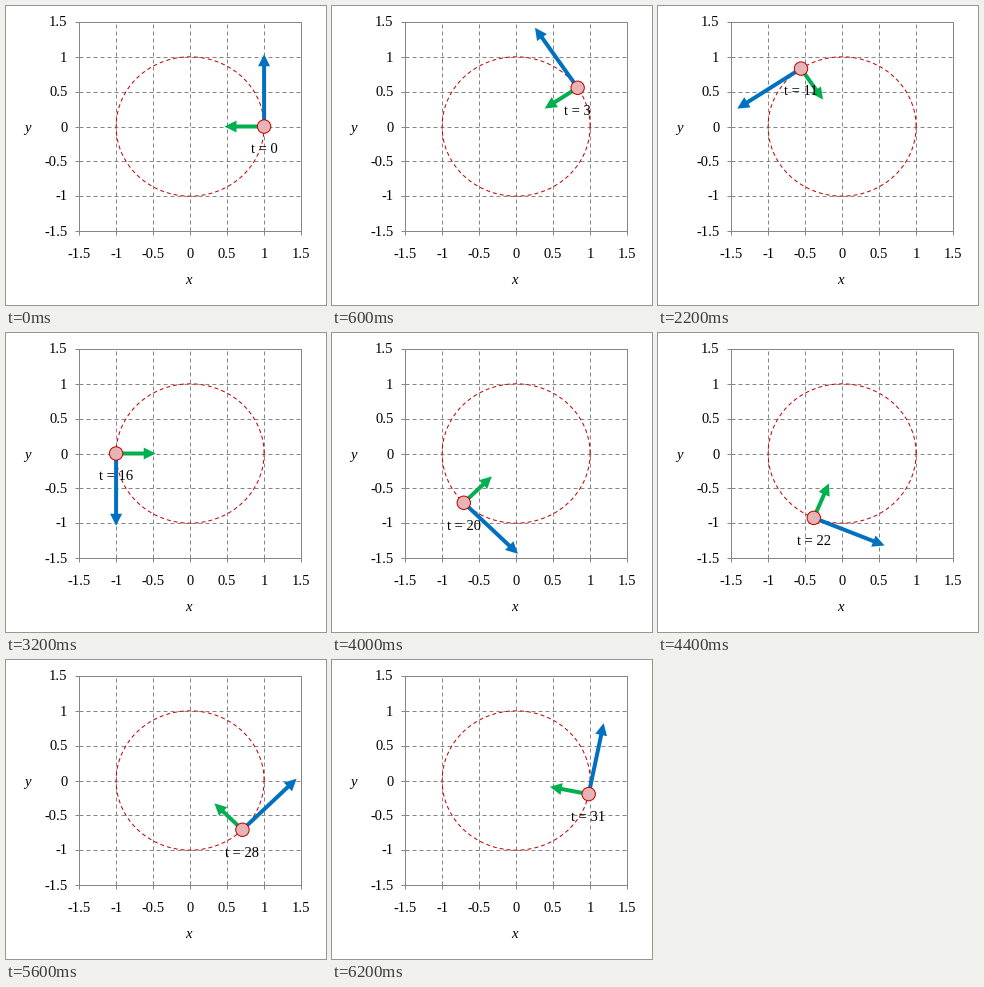
Animation of 320x299 px, one loop 6.4 s. Source, as a matplotlib script:

```python
import numpy as np
import matplotlib.pyplot as plt
from matplotlib.animation import FuncAnimation
from matplotlib.patches import Circle, Polygon

WIDTH, HEIGHT, DPI = 320, 299, 64
PT = 72 / DPI  # points per pixel
STEPS = 32
LEFT, RIGHT, TOP, BOTTOM = 73.5, 295.5, 16.5, 225.5
GRAY, RED, BLUE, GREEN = "#868686", "#c00000", "#0070c0", "#00b050"
TICKS = [-1.5, -1, -0.5, 0, 0.5, 1, 1.5]

plt.rcParams["font.family"] = "Liberation Serif"
plt.rcParams["font.size"] = 14.67 * PT

fig = plt.figure(figsize=(WIDTH / DPI, HEIGHT / DPI), dpi=DPI, facecolor="white")
ax = fig.add_axes([0, 0, 1, 1])
ax.set_xlim(0, WIDTH)
ax.set_ylim(HEIGHT, 0)
ax.axis("off")


def to_px(x, y):
    return np.array([184.1 + 74 * x, 120.5 - 69.67 * y])


def line(xs, ys, color=GRAY, dashed=False, **kwargs):
    style = (0, (4, 3)) if dashed else "-"
    ax.plot(xs, ys, color=color, lw=PT, ls=style, dash_capstyle="butt",
            solid_capstyle="projecting", snap=False, **kwargs)


def arrow_outline(start, end, shaft=4, head=12, overshoot=2.6):
    """Corners of an arrow whose tip lies slightly past its end point."""
    along = (end - start) / np.hypot(*(end - start))
    across = np.array([-along[1], along[0]])
    tip = end + overshoot * along
    neck = tip - head * along
    side, wing = across * shaft / 2, across * head / 2
    return [start + side, neck + side, neck + wing, tip,
            neck - wing, neck - side, start - side]


def draw_chart():
    for value in TICKS:
        px = LEFT + (value + 1.5) / 3 * (RIGHT - LEFT)
        py = BOTTOM - (value + 1.5) / 3 * (BOTTOM - TOP)
        px, py = np.floor(px) + 0.5, np.floor(py) + 0.5
        if abs(value) < 1.5:
            line([px, px], [BOTTOM, TOP], dashed=True)
            line([LEFT, RIGHT], [py, py], dashed=True)
        line([px, px], [BOTTOM, BOTTOM + 3.5])
        line([LEFT - 3.5, LEFT], [py, py])
        ax.text(px - 0.4, 252, f"{value:g}", ha="center", va="baseline")
        ax.text(61.5, py + 4, f"{value:g}", ha="right", va="baseline")
    line([LEFT, RIGHT, RIGHT, LEFT, LEFT], [TOP, TOP, BOTTOM, BOTTOM, TOP])
    ax.text(182.5, 278.5, "x", style="italic", ha="center", va="baseline")
    ax.text(21.7, 126, "y", style="italic", ha="center", va="baseline")
    angles = np.linspace(0, 2 * np.pi, 200)
    line(*to_px(np.cos(angles), np.sin(angles)), color=RED, dashed=True, zorder=3)


draw_chart()
velocity = ax.add_patch(Polygon(np.zeros((7, 2)), fc=BLUE, lw=0, zorder=5))
acceleration = ax.add_patch(Polygon(np.zeros((7, 2)), fc=GREEN, lw=0, zorder=4))
ball = ax.add_patch(Circle((0, 0), 6.7, fc="#e6b4b4", ec=RED, lw=PT, zorder=6))
label = ax.text(0, 0, "", ha="center", va="baseline", zorder=7)


def update(step):
    angle = 2 * np.pi * step / STEPS
    x, y = np.cos(angle), np.sin(angle)
    center = to_px(x, y)
    velocity.set_xy(arrow_outline(center, to_px(x - y, y + x)))
    acceleration.set_xy(arrow_outline(center, to_px(x / 2, y / 2)))
    ball.center = center
    label.set_position(center + [-0.2, 26.8])
    label.set_text(f"t = {step}")
    return velocity, acceleration, ball, label


animation = FuncAnimation(fig, update, frames=STEPS, interval=200,
                          repeat=True, repeat_delay=0)
plt.show()
```
